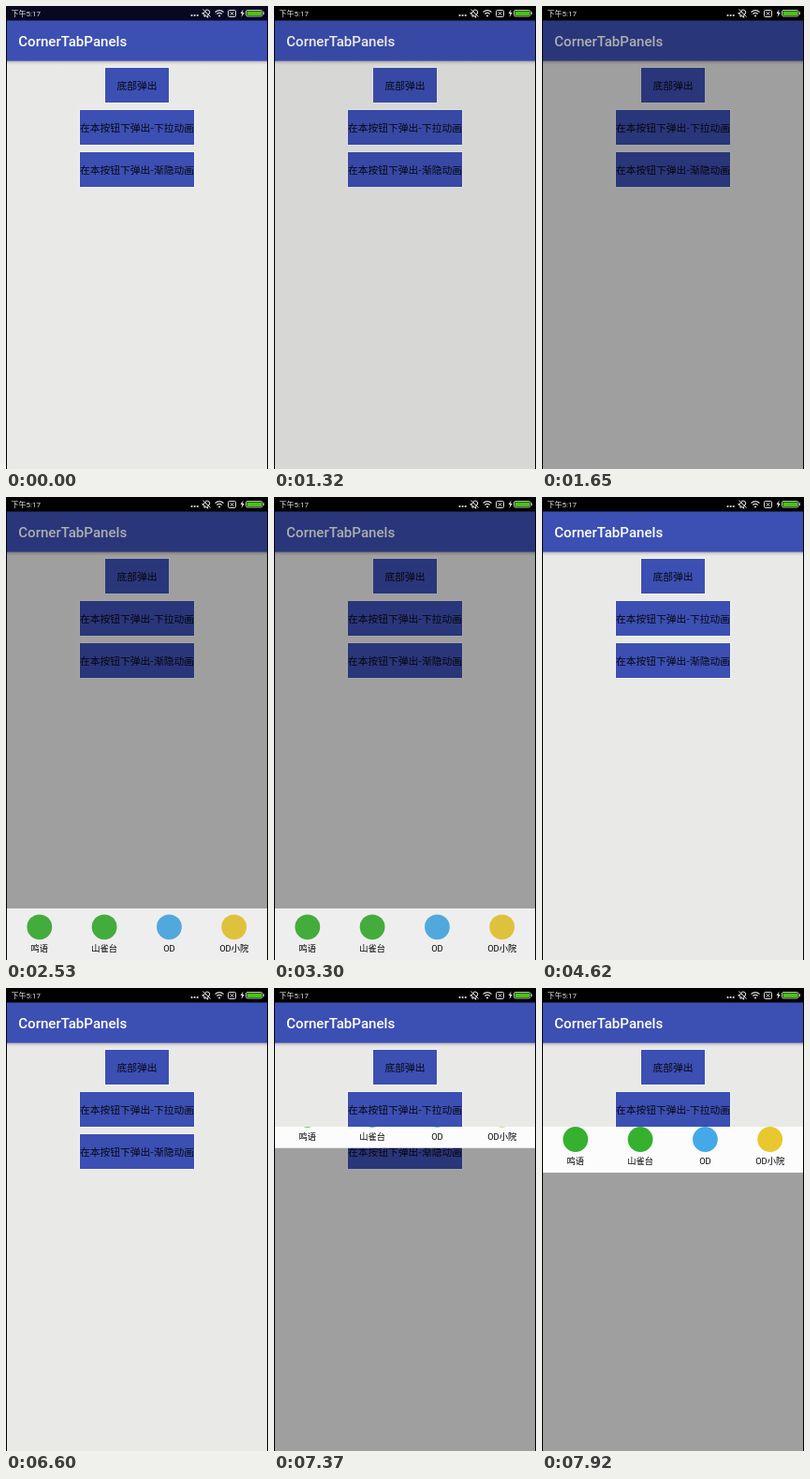
An HTML page that plays this animation: 280x494 px, repeating every 8000 ms.

```html
<!DOCTYPE html>
<html lang="zh-CN">
<head>
<meta charset="utf-8">
<title>Drawer demo</title>
<style>
  html, body { margin: 0; width: 100%; height: 100%; overflow: hidden; background: #000; }
  svg { display: block; width: 280px; height: 494px; }
  text { font-family: Roboto, "Noto Sans CJK SC", "Noto Sans CJK", sans-serif; }
  .title { font-size: 15.1px; font-weight: 500; fill: #fff; }
  .btn { font-family: "Noto Sans CJK SC", "Noto Sans CJK", sans-serif; font-size: 10.75px; text-anchor: middle; fill: #08080f; }
  .label { font-size: 9.3px; text-anchor: middle; fill: #000; }
  .clock { font-size: 8px; fill: #e4e4e4; }
</style>
</head>
<body>
<svg viewBox="0 0 280 494">
  <defs>
    <linearGradient id="shade" x1="0" y1="0" x2="0" y2="1">
      <stop offset="0" stop-color="#5c4c50" stop-opacity=".36"/>
      <stop offset="1" stop-color="#b8a8a8" stop-opacity="0"/>
    </linearGradient>
    <clipPath id="dropClip"><rect x="1" y="148" width="278" height="346"/></clipPath>
  </defs>

  <rect x="1" y="15" width="278" height="479" fill="#e9e9e8"/>
  <rect x="1" y="58.700" width="278" height="4.300" fill="url(#shade)"/>
  <rect x="1" y="15" width="278" height="43.700" fill="#3c4fb3"/>
  <text class="title" x="13.2" y="43">CornerTabPanels</text>
  <g id="buttons"></g>

  <rect id="dim" x="1" y="15" width="278" height="479" opacity="0"/>
  <rect id="dropDim" x="1" y="148" width="278" height="346" opacity="0"/>

  <g id="sheet"></g>
  <g clip-path="url(#dropClip)"><g id="drop"></g></g>

  <rect id="bar" width="280" height="15.5"/>
  <text class="clock" x="5.5" y="10.8">下午5:17</text>
  <g fill="none" stroke="#ddd" stroke-width="1">
    <g fill="#ddd" stroke="none">
      <circle cx="198.5" cy="10" r="1.1"/><circle cx="201.6" cy="10" r="1.1"/><circle cx="204.7" cy="10" r="1.1"/>
    </g>
    <path transform="rotate(35 214.5 7.5)" d="M212 9V6.500a2.500 2.500 0 0 1 5 0V9L218 10.500H211ZM213.500 11.800H215.500"/>
    <path d="M210.500 3.500L218.500 11.500"/>
    <path d="M223.500 6.500Q228 2.700 232.500 6.500M225.300 8.500Q228 6.200 230.700 8.500" stroke-width="1.2"/>
    <circle cx="228" cy="10.500" r="1.1" fill="#ddd" stroke="none"/>
    <rect x="237.500" y="4.500" width="8" height="7" rx="1"/>
    <path d="M239.700 6.200L243.300 9.800M243.300 6.200L239.700 9.800"/>
    <path d="M253.500 3.500L250.500 8H252.300L251.500 12L254.800 7H252.800Z" fill="#ddd" stroke="none"/>
    <rect x="256.500" y="4.500" width="17.500" height="6.500" rx="1.5" stroke="#b5c7ad"/>
    <rect x="257.500" y="5.500" width="15.500" height="4.500" fill="#48c412" stroke="none"/>
    <path d="M275.300 6.300V9.200"/>
  </g>
  <path d="M.5 0V494M279.500 0V494" stroke="#000"/>
</svg>
<script>
const LOOP = 8000, STEP = 110, DIM = 0.317;
const SHEET_H = 55, DROP_H = 49;
const $ = id => document.getElementById(id);

function add(parent, tag, attrs, text) {
  const el = document.createElementNS("http://www.w3.org/2000/svg", tag);
  for (const k in attrs) el.setAttribute(k, attrs[k]);
  if (text) el.textContent = text;
  parent.appendChild(el);
}

[
  ["底部弹出", 106, 68],
  ["在本按钮下弹出-下拉动画", 79, 122],
  ["在本按钮下弹出-渐隐动画", 79, 122]
].forEach(([label, x, width], i) => {
  const y = 66 + 45 * i, height = 37;
  // faint light rim around each button
  add($("buttons"), "rect", { x: x - 1, y: y - 1, width: width + 2, height: height + 2, fill: "#fff", opacity: 0.4 });
  add($("buttons"), "rect", { x, y, width, height, fill: "#3c4fb3" });
  add($("buttons"), "text", { class: "btn", x: x + width / 2, y: y + 22.9 }, label);
});

const labels = ["鸣语", "山雀台", "OD", "OD小院"];

function fillPanel(panel, top, height, iconY, back, colors) {
  add(panel, "rect", { x: 1, y: top, width: 278, height, fill: back });
  labels.forEach((label, i) => {
    const x = 35.8 + i * 69.3;
    add(panel, "circle", { cx: x, cy: iconY, r: 13.4, fill: colors[i] });
    add(panel, "text", { class: "label", x, y: iconY + 26.4 }, label);
  });
}
fillPanel($("sheet"), 439, SHEET_H, 458.8, "#eeeeee", ["#43ac3c", "#43ac3c", "#50a8dc", "#dfc23c"]);
fillPanel($("drop"), 148, DROP_H, 161.5, "#fcfcfc", ["#35b02f", "#35b02f", "#44a9e8", "#e9c72f"]);

// [time, value] pairs
const tracks = {
  bar: [[0, 1], [440, 0]],
  dim: [[1210, 0], [1650, 1], [4070, 1], [4510, 0]],
  sheet: [[1780, 0], [2440, 1], [3540, 1], [4200, 0]],
  dropDim: [[6600, 0], [7040, 1]],
  drop: [[7055, 0], [7715, 1]]
};
const smooth = p => (1 - Math.cos(Math.PI * p)) / 2;

function valueAt(track, t, ease = p => p) {
  const next = track.findIndex(k => k[0] > t);
  if (next === 0) return track[0][1];
  if (next < 0) return track[track.length - 1][1];
  const [t0, a] = track[next - 1], [t1, b] = track[next];
  return a + (b - a) * ease((t - t0) / (t1 - t0));
}

function draw(now) {
  const t = Math.floor((now % LOOP) / STEP) * STEP;
  const navy = valueAt(tracks.bar, t);
  $("bar").setAttribute("fill", `rgb(${8 * navy},${8 * navy},${32 * navy})`);
  for (const id of ["dim", "dropDim"]) $(id).setAttribute("opacity", DIM * valueAt(tracks[id], t));
  const up = valueAt(tracks.sheet, t, smooth), down = valueAt(tracks.drop, t, smooth);
  $("sheet").setAttribute("transform", `translate(0 ${(1 - up) * (SHEET_H + 1)})`);
  $("drop").setAttribute("transform", `translate(0 ${(down - 1) * DROP_H})`);
}

const start = performance.now();
function tick() {
  draw(performance.now() - start);
  requestAnimationFrame(tick);
}
tick();
</script>
</body>
</html>
```
